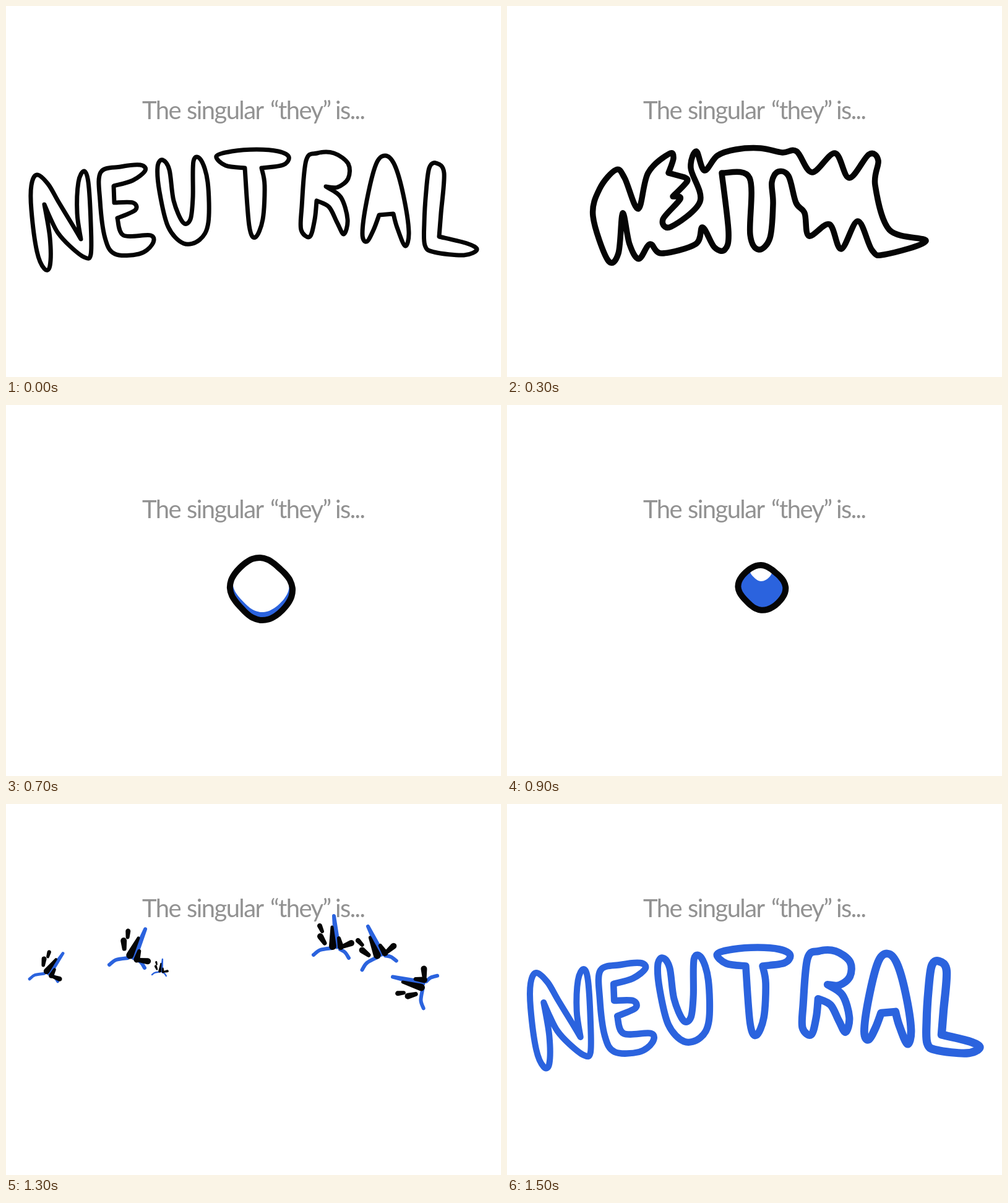
Write an HTML page that moves like this. It is 800x600 px and loops after 1.6 s.

```html
<!DOCTYPE html>
<html lang="en">
<head>
<meta charset="utf-8">
<title>Neutral</title>
<style>
  html, body { margin: 0; width: 100%; height: 100%; overflow: hidden; background: #fff; }
  svg { display: block; width: 100vw; height: 100vh; }
  text { font: 400 40px Lato, "Open Sans", sans-serif; letter-spacing: -1.6px; fill: #929292; }
  path { fill: none; stroke-linecap: round; stroke-linejoin: round; vector-effect: non-scaling-stroke; }
  .pose { visibility: hidden; animation: show 1.6s step-end infinite; animation-delay: calc(var(--i) * 100ms - 1600ms); }
  @keyframes show { 0% { visibility: visible; } 6.25%, 100% { visibility: hidden; } }
</style>
</head>
<body>
<svg id="stage" viewBox="0 0 800 600">
  <text y="183"><tspan x="220">The</tspan><tspan x="292">singular</tspan><tspan x="427">“they”</tspan><tspan x="532">is...</tspan></text>
</svg>
<script>
const BLACK = '#050505', BLUE = '#2b63de', WHITE = '#fff';
const stage = document.getElementById('stage');

function add(parent, tag, attrs) {
  const el = document.createElementNS('http://www.w3.org/2000/svg', tag);
  for (const k in attrs) el.setAttribute(k, attrs[k]);
  return parent.appendChild(el);
}

const pose = i => add(stage, 'g', { class: 'pose', style: `--i:${i}` });
const shift = (g, transform) => add(g, 'g', { transform });
const scaled = (g, cx, cy, sx, sy) =>
  shift(g, `translate(${cx} ${cy}) scale(${sx} ${sy}) translate(${-cx} ${-cy})`);

// "x,y x,y ..." to points; "!" marks a corner, stored twice
const parse = str => str.split(' ').flatMap(s => {
  const p = s.replace('!', '').split(',').map(Number);
  return s.endsWith('!') ? [p, p] : [p];
});

// Smooth curve through the points
function smooth(p, closed) {
  const n = p.length;
  const at = i => closed ? p[(i + n) % n] : p[Math.max(0, Math.min(n - 1, i))];
  let d = `M${p[0]}`;
  for (let i = 0; i < (closed ? n : n - 1); i++) {
    const [a, b, c, e] = [at(i - 1), at(i), at(i + 1), at(i + 2)];
    if (b === c) continue;
    const c1 = b.map((v, k) => v + (c[k] - a[k]) / 6);
    const c2 = c.map((v, k) => v - (e[k] - b[k]) / 6);
    d += `C${c1} ${c2} ${c}`;
  }
  return closed ? d + 'Z' : d;
}

const line = (g, pts, w, stroke) =>
  add(g, 'path', { d: smooth(pts), stroke, 'stroke-width': w });
const loop = (g, pts, w, stroke = BLACK, fill = 'none') =>
  add(g, 'path', { d: smooth(pts, true), stroke, 'stroke-width': w, style: `fill:${fill}` });

// Tapered drop from a round head (x, y, r) to a tip (u, v, s)
function drop(g, fill, [x, y], r, [u, v], s) {
  const a = Math.atan2(v - y, u - x);
  const b = Math.acos((r - s) / Math.hypot(u - x, v - y));
  const on = (cx, cy, q, t) => `${cx + q * Math.cos(t)},${cy + q * Math.sin(t)}`;
  const big = r > s ? 1 : 0;
  add(g, 'path', {
    d: `M${on(x, y, r, a + b)}A${r} ${r} 0 ${big} 1 ${on(x, y, r, a - b)}` +
       `L${on(u, v, s, a - b)}A${s} ${s} 0 ${1 - big} 1 ${on(u, v, s, a + b)}Z`,
    style: `fill:${fill}`
  });
}

const LETTERS = [
  '50,273 41,290 41,330 50,397 62,425 71,420 71,375 62,321! 72,344 84,367 103,388 126,406 137,402 137,350 133,285 126,267 117,285 115,335 121,377! 108,355 85,317 68,288',
  '153,269 185,260 217,257 225,266 205,282 174,291! 175,318! 205,318 209,330 180,343! 190,371 234,371 236,386 215,401 176,401 160,375 152,315',
  '253,249 245,260 248,300 262,357 287,384 313,378 327,350 326,285 315,249 303,251 302,310 298,345 286,350 271,315 264,265',
  '340,243 365,235 405,232 440,235 457,244 448,257 413,262! 418,290 415,345 403,374 393,355 386,262! 355,258',
  '485,250 503,238 530,238 553,255 553,279 536,293 517,292! 541,309 552,345 546,369 535,350 522,325 502,315! 499,345 491,373 477,362 478,325',
  '613,242 598,256 583,315 576,368 583,381 594,362 603,338! 626,336! 632,358 645,388 651,365 642,305 628,257',
  '695,254 684,262 679,300 676,350 677,387 692,398 740,403 761,394 745,384 700,373! 703,335 708,270'
].map(parse);

// Weight grows by `grow` from letter to letter
function word(g, w, stroke, grow = 0) {
  LETTERS.forEach((p, i) => loop(g, p, w + grow * i, stroke));
}

word(pose(0), 7, BLACK);

// Letters crowd together and merge
word(scaled(pose(1), 405, 0, .92, 1), 8, BLACK);
const crowd = scaled(pose(2), 405, 0, .84, 1);
word(crowd, 12, BLACK);
LETTERS.forEach(p => loop(crowd, p, 0, 'none', WHITE));

loop(pose(3), parse('176,265 190,278 212,328 228,270 262,239 269,246 261,270! 287,277! 291,284 268,308! 280,312 252,345 265,357 312,316 297,262 306,235 319,266 340,242 370,232 410,230 445,237 468,235 493,269 530,238 553,278 585,240 600,250 595,290 618,362 677,380 610,402 590,395 567,348 540,393 521,353 488,372 481,335 467,318 455,275 438,268 428,285 430,320 425,375 407,394 393,370 392,278 347,270! 358,365 352,394 335,390 316,358 305,385 250,400 231,385 213,409 198,385 187,335 180,400 163,411 139,340 150,295'), 9.5);

// One puddle, squeezed narrower and taller
const PUDDLE = parse('342,243 390,239 422,248 485,235 508,245 497,285 525,313 554,338 530,350 483,354 465,392 445,400 418,361 408,400 393,411 380,402 374,354 322,361 308,350 317,312 272,318 264,311 295,262');
[[4, 1.4, 1.02], [5, 1, 1], [6, .5, 1.27]].forEach(([i, sx, sy]) =>
  loop(scaled(pose(i), 410, 305, sx, sy), PUDDLE, 10.5));

// Ball shrinks while blue pools inside
const BALL = Array.from({ length: 24 }, (_, i) => {
  const t = i / 24 * 2 * Math.PI;
  const r = 48.5 + 2 * Math.cos(4 * t) + 2 * Math.sin(2 * t) + 2 * Math.cos(t - Math.PI / 4);
  return [411 + r * Math.cos(t), 296 + r * Math.sin(t)];
});
for (let i = 0; i < 3; i++) {
  const g = scaled(pose(7 + i), 410, 290, 1 - .12 * i, 1 - .14 * i);
  loop(g, BALL, 0, 'none', BLUE);
  loop(scaled(g, 409, 240 - 4 * i, .9 - .22 * i, .88 - .22 * i), BALL, 0, 'none', WHITE);
  loop(g, BALL, 10);
}

// Where the drops land, and how each splash leans
const SPLASHES = [
  { at: [66, 275], lean: 40, size: .8 },
  { at: [202, 250], lean: 28, size: 1 },
  { at: [532, 234], lean: 0, size: 1 },
  { at: [605, 247], lean: -20, size: 1 },
  { at: [676, 294], lean: -72, size: 1 },
  { at: [250, 272], lean: 10, size: .4 }
];
const DROPS = [
  { head: [355, 221], tip: [376, 250] },
  { head: [384, 196], tip: [404, 235] },
  { head: [449, 213], tip: [419, 238] },
  { head: [448, 234], tip: [443, 260] },
  { head: [502, 271], tip: [458, 286] }
];
const mix = (a, b, k) => a.map((v, i) => v + (b[i] - v) * k);

function flyer(g, head, tip) {
  const side = head[0] < 412 ? -3 : 5;
  const wet = p => [p[0] + side, p[1] + 4];
  drop(g, BLUE, wet(head), 5.5, wet(mix(head, tip, .5)), 4);
  drop(g, BLACK, head, 6.5, tip, 2.5);
}

const burst = [scaled(pose(10), 412, 325, .6, .6), pose(11)];
burst.forEach(g => DROPS.forEach(({ head, tip }) => flyer(g, head, tip)));

// Top of the arc: halfway to the landing, lifted
const arc = pose(12);
DROPS.forEach(({ head }, i) => {
  const { at } = SPLASHES[i];
  const top = mix(head, at, .5);
  top[1] -= 112 - 20 * Math.abs(i - 1.5);
  const d = Math.hypot(at[0] - head[0], at[1] - head[1]);
  flyer(arc, top, top.map((v, k) => v - 32 * (at[k] - head[k]) / d));
});

const splash = pose(13);
SPLASHES.forEach(({ at: [x, y], lean, size }) => {
  const place = turn => shift(splash, `translate(${x} ${y}) rotate(${turn}) scale(${size})`);
  const wings = place(Math.min(lean, 0));
  line(wings, parse('-35,10 -24,2 -5,-1'), 6 * size, BLUE);
  line(wings, parse('8,1 16,6 22,15'), 6 * size, BLUE);
  const g = place(lean);
  drop(g, BLUE, [-2, -53], 3, [3, -5], 5.5);
  drop(g, BLACK, [-5, -35], 2.5, [-4, -4], 6);
  drop(g, BLACK, [6, -17], 3, [9, -3], 5);
  drop(g, BLACK, [-24, -20], 5, [-17, -9], 3.5);
  drop(g, BLACK, [26, -9], 5, [13, -4], 3.5);
  drop(g, BLACK, [-25, -37], 4, [-21, -28], 3);
});

// Letters fill in, a little wider than at the start
word(pose(14), 8, BLUE, .3);
word(scaled(pose(15), 402, 320, 1.008, 1), 10, BLUE, .55);
</script>
</body>
</html>
```
